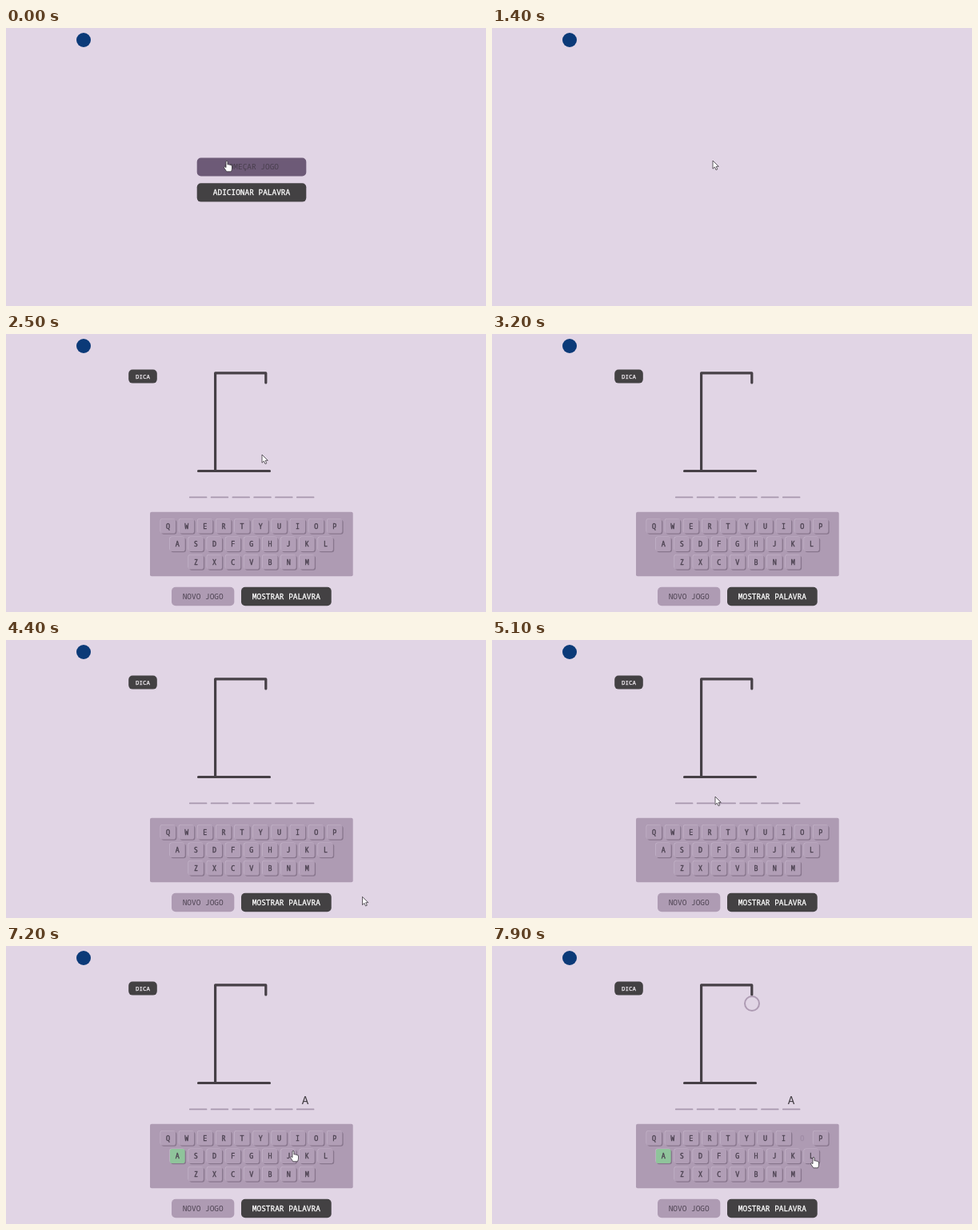
Write an HTML page that moves like this. It is 600 px wide and 348 px high and loops after 8 s.

```html
<!DOCTYPE html>
<html lang="pt">
<head>
<meta charset="utf-8">
<title>Jogo da forca</title>
<style>
html, body { margin: 0; width: 100%; height: 100%; overflow: hidden; background: #e1d5e5; }
svg { display: block; width: 100%; height: 100%; }
text { font-family: "Noto Sans Mono", "DejaVu Sans Mono", monospace; text-anchor: middle; }
</style>
</head>
<body>
<svg id="stage" viewBox="0 0 600 348"></svg>
<script>
const NS = "http://www.w3.org/2000/svg";
const LOOP = 8000, STEP = 100;
const DARK = "#434143", MAUVE = "#ae9bb3", INK = "#4c4251";
const stage = document.getElementById("stage");

function add(parent, tag, attrs, content) {
  const el = document.createElementNS(NS, tag);
  for (const k in attrs) el.setAttribute(k, attrs[k]);
  if (content) el.textContent = content;
  parent.appendChild(el);
  return el;
}
const group = parent => add(parent, "g", {});
const box = (parent, x, y, width, height, rx, fill) =>
  add(parent, "rect", { x, y, width, height, rx, fill });
// A thin outline in the text colour gives the medium weights
const label = (parent, x, y, size, fill, outline, content) =>
  add(parent, "text", { x, y, "font-size": size, fill, stroke: fill, "stroke-width": outline }, content);
const show = (el, on) => el.setAttribute("visibility", on ? "visible" : "hidden");

function button(parent, x, y, w, h, fill, ink, size, outline, content) {
  box(parent, x, y, w, h, 5, fill);
  label(parent, x + w / 2, y + h / 2 + size * 0.36, size, ink, outline, content);
}

// Brand mark stand-in
add(stage, "circle", { cx: 97, cy: 15, r: 9, fill: "#0b3a78" });

const menu = group(stage);
button(menu, 238.7, 162.5, 136.6, 23, "#6d5a77", "#493f4e", 9.45, 0, "COMEÇAR JOGO");
button(menu, 238.7, 194.2, 136.6, 23.4, DARK, "#fff", 9.45, 0.3, "ADICIONAR PALAVRA");

const game = group(stage);
button(game, 153.2, 44.6, 35.6, 17, DARK, "#f3eef4", 7.5, 0.25, "DICA");
add(game, "path", {
  d: "M240.5 171.5H329.5M261.6 171.5V48.9H324.8V61",
  fill: "none", stroke: "#464046", "stroke-width": 3.2,
  "stroke-linecap": "round", "stroke-linejoin": "round"
});
for (let i = 0; i < 6; i++) box(game, 229 + i * 26.8, 203.5, 22.3, 1.7, 0.5, "#a898ae");
box(game, 180, 222.7, 253.7, 80.5, 2, MAUVE);

const keys = {};
[["QWERTYUIOP", 202.5, 240.5], ["ASDFGHJKL", 214.2, 263], ["ZXCVBNM", 237.4, 285.5]]
  .forEach(([row, left, y]) => [...row].forEach((ch, i) => {
    const x = left + i * 23.15, g = group(game);
    const edge = group(g);
    box(edge, x - 10, y - 9.6, 19, 18, 3, "#c4b4c9");
    box(edge, x - 8.2, y - 7.8, 19, 18, 3, "#88768d");
    const face = box(g, x - 9.3, y - 8.9, 18.8, 18, 2.8, "#b19eb6");
    const text = label(g, x, y + 3, 8.4, INK, 0.4, ch);
    keys[ch] = { x, y, edge, face, text };
  }));

button(game, 207, 316.8, 78.3, 23.4, MAUVE, INK, 9.45, 0, "NOVO JOGO");
button(game, 294, 316.8, 112.7, 23.4, DARK, "#fff", 9.45, 0.3, "MOSTRAR PALAVRA");

const guess = label(game, 374, 198.2, 15, "#454046", 0, "A");
const head = add(game, "circle", {
  cx: 325, cy: 72, r: 9, fill: "none", stroke: MAUVE, "stroke-width": 2
});

// Pointer shapes, each with its hot spot at 0,0
const pen = { fill: "#fff", stroke: "#39343c", "stroke-width": 0.8, "stroke-linejoin": "round" };
const pointers = {
  arrow: add(stage, "path", { d: "M0 0V10.2L2.4 8L4 11.6L5.8 10.8L4.2 7.3H7.3Z", ...pen }),
  hand: add(stage, "path", {
    d: "M-1 1Q0 -.6 1 1V5Q2.4 4.1 3 5.3Q4.3 4.6 4.9 5.8Q6.4 5.4 6.5 7V10Q6.4 12 5.4 13.8H-.2L-3.4 9Q-3.6 7.4 -2.3 7.6L-1 8.7Z",
    ...pen
  }),
  text: add(stage, "path", {
    d: "M-1.6 -5H1.6M0 -5V5M-1.6 5H1.6", fill: "none", stroke: "#3f3742", "stroke-width": 0.9
  })
};

// Pointer path: time, x, y
const trips = [
  [[0, 276, 166], [1600, 276, 166], [2100, 317, 149], [2500, 320, 151], [2950, 453, 329]],
  [[4300, 453, 327], [5100, 279, 196], [5600, 258, 212], [5900, 252, 222], [6100, 236, 246],
   [6400, 214, 262], [6700, 214, 262], [7200, 359, 256], [7500, 387, 239], [7700, 387, 239],
   [7900, 402, 264], [8000, 402, 264]]
];

function pointerAt(t) {
  const trip = trips.find(p => t >= p[0][0] && t < p[p.length - 1][0]);
  if (!trip) return null;
  const i = trip.findIndex(p => p[0] > t);
  const [t0, x0, y0] = trip[i - 1], [t1, x1, y1] = trip[i];
  const u = (t - t0) / (t1 - t0), e = u * u * (3 - 2 * u);
  return [x0 + (x1 - x0) * e, y0 + (y1 - y0) * e];
}

const inside = (x, y, l, t, w, h) => x >= l && x <= l + w && y >= t && y <= t + h;

function pointerKind(x, y, t) {
  if (t < 1200) return "hand";
  if (t < 1600) return "arrow";
  if (Object.values(keys).some(k => inside(x, y, k.x - 10, k.y - 9, 20, 18))) return "hand";
  if (inside(x, y, 294, 317, 112, 23)) return "hand";
  return inside(x, y, 180, 223, 253, 80) ? "text" : "arrow";
}

function draw(t) {
  show(menu, t < 1200);
  game.setAttribute("display", t >= 1600 ? "inline" : "none");
  const hit = t >= 6500, miss = t >= 7700;
  show(guess, hit);
  show(head, miss);
  keys.A.face.setAttribute("fill", hit ? "#8fc49b" : "#b19eb6");
  show(keys.O.edge, !miss);
  keys.O.face.setAttribute("fill", miss ? MAUVE : "#b19eb6");
  for (const paint of ["fill", "stroke"]) keys.O.text.setAttribute(paint, miss ? "#a08da6" : INK);

  const pos = pointerAt(t);
  const kind = pos && pointerKind(pos[0], pos[1], t);
  for (const name in pointers) show(pointers[name], name === kind);
  if (kind) pointers[kind].setAttribute("transform", `translate(${pos[0]} ${pos[1]})`);
}

const start = performance.now();
function tick() {
  const t = (performance.now() - start) % LOOP;
  draw(Math.floor(t / STEP) * STEP);
  requestAnimationFrame(tick);
}
draw(0);
requestAnimationFrame(tick);
</script>
</body>
</html>
```
